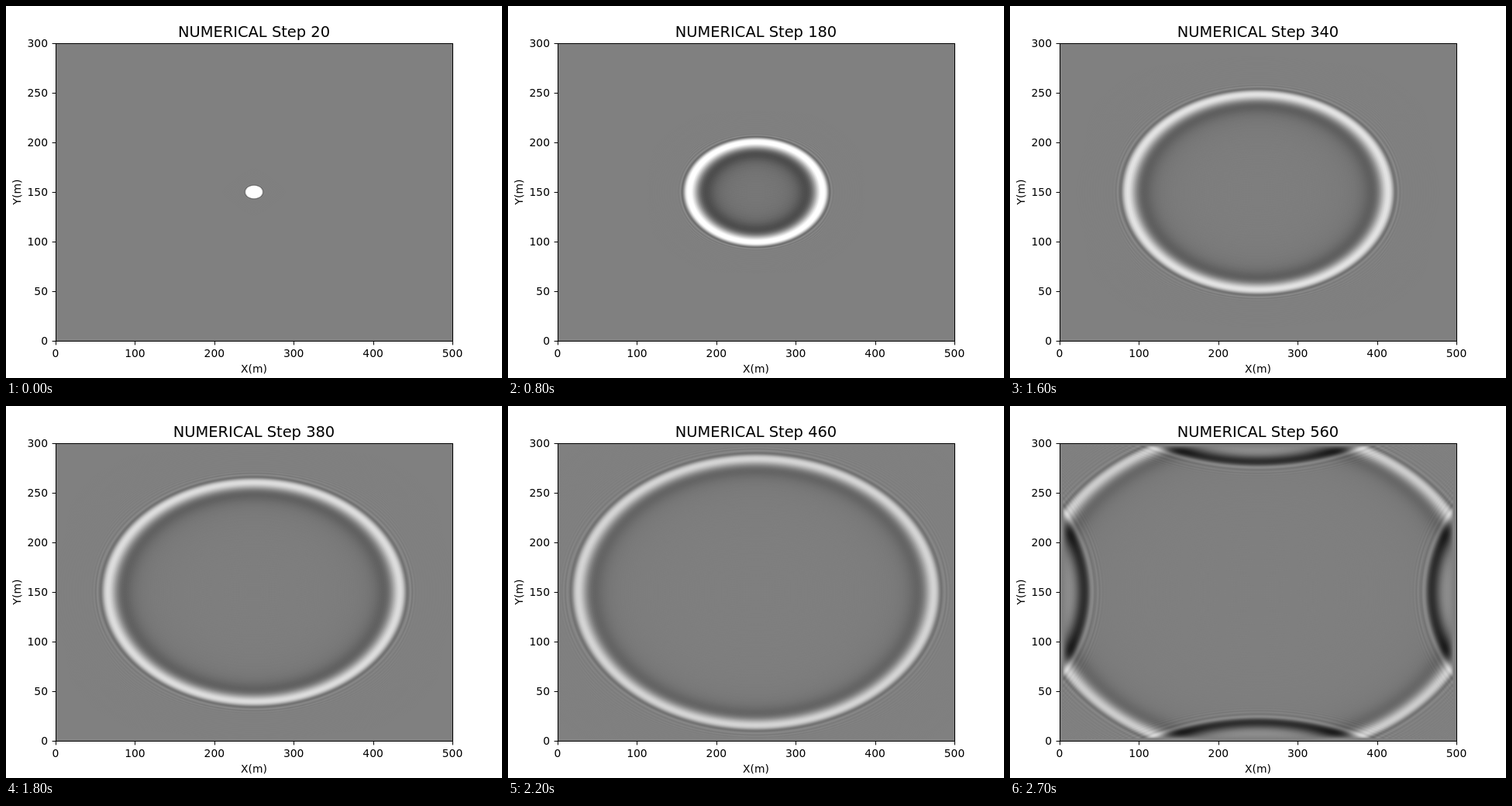
An HTML page with a canvas that plays this animation: 640x480 px, repeating every 2.8 s.

```html
<!DOCTYPE html>
<html>
<head>
<meta charset="utf-8">
<style>
  html, body { margin: 0; overflow: hidden; background: #fff; }
  canvas { display: block; }
</style>
</head>
<body>
<canvas id="stage" width="640" height="480"></canvas>
<script>
const FRAMES = 28, FRAME_MS = 100, STEPS = 20;
const PLOT = { x: 64, y: 48, w: 512, h: 384 };
const ctx = document.getElementById('stage').getContext('2d');

// Acoustic wave on a square grid; symmetry lets one quadrant stand for all.
const HALF = 250, PAD = 4, ROW = HALF + PAD + 1, SIZE = 2 * HALF + 1;
const COURANT2 = 0.25, PEAK_FREQ = 0.01, GAIN = 5.6;
const W0 = -205 / 72, W1 = 8 / 5, W2 = -1 / 5, W3 = 8 / 315, W4 = -1 / 560;
const at = (x, y) => (y + PAD) * ROW + x + PAD;

function ricker(step) {
  const a = (Math.PI * PEAK_FREQ * step) ** 2;
  return (1 - 2 * a) * Math.exp(-a);
}

function advance(u, next, step) {
  const A = ROW, B = 2 * ROW, C = 3 * ROW, D = 4 * ROW, end = HALF - PAD;
  for (let y = 0; y <= end; y++) {
    for (let x = 0, i = at(0, y); x <= end; x++, i++) {
      const laplacian = 2 * W0 * u[i]
        + W1 * (u[i - 1] + u[i + 1] + u[i - A] + u[i + A])
        + W2 * (u[i - 2] + u[i + 2] + u[i - B] + u[i + B])
        + W3 * (u[i - 3] + u[i + 3] + u[i - C] + u[i + C])
        + W4 * (u[i - 4] + u[i + 4] + u[i - D] + u[i + D]);
      next[i] = 2 * u[i] - next[i] + COURANT2 * laplacian;
    }
  }
  next[at(0, 0)] += ricker(step);
  for (let k = 1; k <= PAD; k++) {
    for (let j = 0; j <= end; j++) {
      next[at(-k, j)] = next[at(k, j)];
      next[at(j, -k)] = next[at(j, k)];
    }
  }
}

function picture(u) {
  const canvas = document.createElement('canvas');
  canvas.width = canvas.height = SIZE;
  const c = canvas.getContext('2d'), image = c.createImageData(SIZE, SIZE);
  const pixels = new Uint32Array(image.data.buffer);
  for (let y = 0, i = 0; y < SIZE; y++) {
    for (let x = 0; x < SIZE; x++, i++) {
      const v = u[at(Math.abs(x - HALF), Math.abs(y - HALF))];
      const grey = Math.max(0, Math.min(255, Math.floor(128 + 128 * GAIN * v)));
      pixels[i] = 0xff000000 | grey * 0x010101;
    }
  }
  c.putImageData(image, 0, 0);
  return canvas;
}

function simulate() {
  let u = new Float64Array(ROW * ROW), next = new Float64Array(ROW * ROW);
  const pictures = [];
  for (let step = 0; step <= FRAMES * STEPS; step++) {
    advance(u, next, step);
    [u, next] = [next, u];
    if (step && step % STEPS === 0) pictures.push(picture(u));
  }
  return pictures;
}

function text(str, x, y, align = 'center', size = 13.89) {
  ctx.font = `${size}px "DejaVu Sans", sans-serif`;
  ctx.textAlign = align;
  ctx.fillText(str, x, y);
}

function drawAxes() {
  const { x, y, w, h } = PLOT, bottom = y + h;
  ctx.fillStyle = ctx.strokeStyle = '#000';
  ctx.lineWidth = 1;
  ctx.strokeRect(x + 0.5, y + 0.5, w, h);
  for (let k = 0; k <= 5; k++) {
    const tx = x + k * w / 5;
    ctx.fillRect(Math.round(tx), bottom, 1, 5.4);
    text(k * 100, tx, bottom + 21);
  }
  for (let k = 0; k <= 6; k++) {
    const ty = bottom - k * h / 6;
    ctx.fillRect(x - 4.4, ty, 4.9, 1);
    text(k * 50, x - 10, ty + 5, 'right');
  }
  text('X(m)', 320, 473);
  ctx.save();
  ctx.translate(19, 240);
  ctx.rotate(-Math.PI / 2);
  text('Y(m)', 0, 0);
  ctx.restore();
}

const pictures = simulate();
const start = performance.now();

function draw() {
  const elapsed = Math.max(0, performance.now() - start);
  const frame = Math.floor(elapsed / FRAME_MS) % FRAMES;
  ctx.fillStyle = '#fff';
  ctx.fillRect(0, 0, 640, 480);
  ctx.imageSmoothingQuality = 'high';
  ctx.drawImage(pictures[frame], PLOT.x, PLOT.y, PLOT.w, PLOT.h);
  drawAxes();
  text(`NUMERICAL Step ${(frame + 1) * STEPS}`, 320, 40, 'center', 19.44);
  requestAnimationFrame(draw);
}
draw();
</script>
</body>
</html>
```
